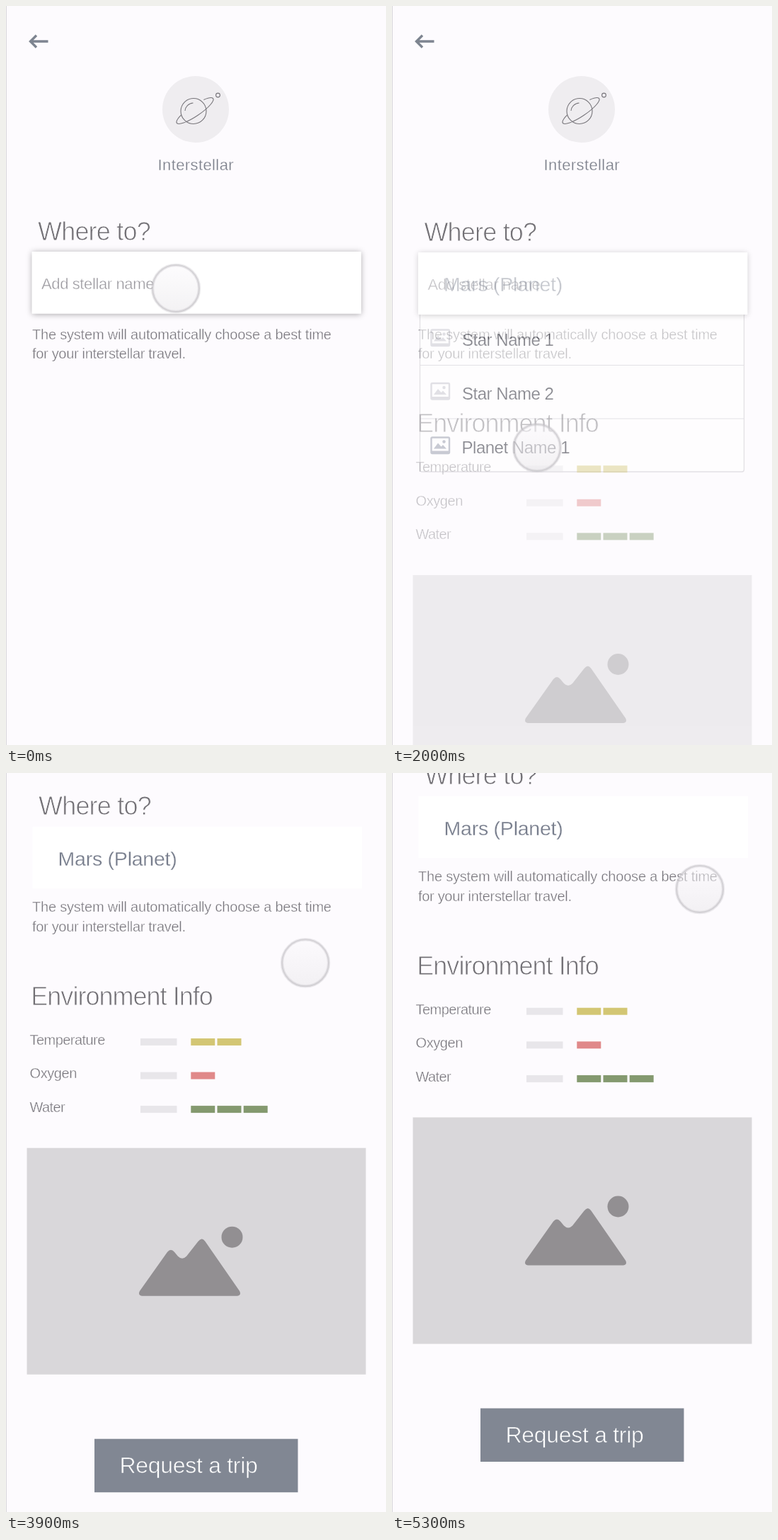
Recreate the animation shown at these times as an HTML page. Size 537 by 1044 pixels, loop 5400 ms.

```html
<!DOCTYPE html>
<html lang="en">
<head>
<meta charset="utf-8">
<title>Trip planner</title>
<style>
  html, body { margin: 0; width: 100%; height: 100%; overflow: hidden; background: #fdfbfe; }
  svg { display: block; width: 537px; height: 1044px; }
  /* a stroke in the backdrop colour slims the letters */
  text { font-family: "Liberation Sans", Arial, sans-serif; stroke: #fdfbfe; stroke-width: .02em; fill: #77757b; }
  .title { font-size: 36px; letter-spacing: -.98px; fill: #727075; stroke-width: .026em; }
  .small { font-size: 20px; }
  .onwhite text { stroke: #fff; }
  .row text { font-size: 24px; letter-spacing: -.48px; fill: #383a43; stroke-width: .01em; }
  .shadow { filter: drop-shadow(0 1px 4px rgba(0, 0, 0, .34)); }
  .line { fill: none; stroke: #77757a; stroke-width: 1.1; }
</style>
</head>
<body>
<svg viewBox="0 0 537 1044">
  <defs>
    <linearGradient id="glass" x1="0" y1="0" x2="0" y2="1">
      <stop offset="0" stop-color="#fbf9fc" stop-opacity=".5"/>
      <stop offset="1" stop-color="#e9e7ea" stop-opacity=".55"/>
    </linearGradient>
    <g id="pic">
      <rect x="55.5" y="457.5" width="25.5" height="22.5" rx="1.5" fill="none" stroke="currentColor" stroke-width="2.4"/>
      <path d="M59 473.5L65 465.5L69.5 470.5L72 468L77 473.5Z" fill="currentColor"/>
      <path d="M56 476.5H81V480H56Z" fill="currentColor"/>
      <circle cx="73.5" cy="463.5" r="2.2" fill="currentColor"/>
    </g>
  </defs>
  <rect width="537" height="1044" fill="#fdfbfe"/>

  <g id="page">
    <path d="M59.5 50H35M43 41.5L34.5 50L43 58.5" fill="none" stroke="#7d8490" stroke-width="3.4"/>
    <circle cx="268" cy="146" r="47" fill="#efedf0"/>
    <g class="line">
      <circle cx="265" cy="148.5" r="18"/>
      <path d="M253 148A12 12 0 0 1 264.5 137"/>
      <path transform="translate(267 148) rotate(-34)" d="M-19-6A31 7.600 0 1 0 19-6"/>
      <circle cx="299.5" cy="126" r="2.9"/>
    </g>
    <text x="214.5" y="232" font-size="22" letter-spacing=".4" style="fill:#7c818b;stroke-width:.014em">Interstellar</text>

    <text class="small" x="37" y="470.5" letter-spacing="-.2">The system will automatically choose a best time</text>
    <text class="small" x="37" y="498" letter-spacing="-.31">for your interstellar travel.</text>

    <g id="menu" class="onwhite">
      <rect x="39.5" y="425" width="458" height="233" rx="3" fill="#fff" stroke="#cfcdd3" stroke-width="1.3"/>
      <path d="M40 507.5H497M40 583H497" stroke="#d2d0d6" stroke-width="1.2"/>
      <g class="row" color="#cdced4">
        <use href="#pic"/>
        <text x="99" y="480">Star Name 1</text>
        <use href="#pic" y="75.5"/>
        <text x="99" y="555.5">Star Name 2</text>
        <use href="#pic" y="152" id="picked"/>
        <text x="98.5" y="631.5">Planet Name 1</text>
      </g>
    </g>

    <g id="field" class="onwhite">
      <text class="title" x="45" y="330.5" style="stroke:#fdfbfe;letter-spacing:-.8px">Where to?</text>
      <rect id="lift" class="shadow" x="37" y="347" width="464.5" height="87.5" fill="#fff"/>
      <rect x="36.5" y="347" width="465.5" height="87.5" fill="#fff"/>
      <text id="hint" x="50" y="400" font-size="22" letter-spacing="-.38" style="fill:#9b999f">Add stellar name</text>
      <text id="choice" x="72.5" y="402" font-size="28.5" letter-spacing="-.23" style="fill:#787e8d;stroke-width:.01em">Mars (Planet)</text>
    </g>

    <g id="info">
      <text class="title" x="35.3" y="602">Environment Info</text>
      <g id="bars"></g>
      <rect x="29.5" y="804" width="479" height="320" fill="#d9d7da"/>
      <g fill="#928f92">
        <path d="M192 1013Q186 1012 189 1006L228 951Q233 945 238 951L243 957Q249 963 255 957L271.500 936Q277 929 281.500 936L330 1006Q333 1012 327 1013Z"/>
        <circle cx="319.5" cy="930" r="15"/>
      </g>
      <rect x="125" y="1215" width="287.5" height="75.5" fill="#818793"/>
      <text x="160.5" y="1263.5" font-size="32" letter-spacing="-.3" style="fill:#fff;stroke:#818793">Request a trip</text>
    </g>
  </g>

  <rect width="1" height="1044" fill="#dad8dc"/>
  <g id="touch">
    <circle r="33.5" fill="url(#glass)"/>
    <circle r="33" fill="none" stroke="#c0bec2" stroke-opacity=".3" stroke-width="4.5"/>
    <circle r="33" fill="none" stroke="#c0bec2" stroke-opacity=".5" stroke-width="2"/>
  </g>
</svg>
<script>
const LOOP = 5400;
const $ = id => document.getElementById(id);

const levels = [["Temperature", 2, "#d3c674", -.55], ["Oxygen", 1, "#e08989", -.4], ["Water", 3, "#84996f", -.6]];
const bar = (x, y, w, color) => `<rect x="${x}" y="${y}" width="${w}" height="10" fill="${color}"/>`;
$("bars").innerHTML = levels.map(([name, count, color, gap], i) => {
  const y = 649.2 + i * 47.6;
  let row = `<text class="small" x="33.5" y="${y + 8.8}" letter-spacing="${gap}">${name}</text>` + bar(190, y, 51.5, "#e8e6ea");
  for (let k = 0; k < count; k++) row += bar(261.3 + k * 37.2, y, 34, color);
  return row;
}).join("");

// smooth curve through [time, value] points without overshoot
function track(pts) {
  const n = pts.length;
  const rise = i => (pts[i + 1][1] - pts[i][1]) / (pts[i + 1][0] - pts[i][0]);
  const slope = pts.map((_, i) => {
    if (i === 0 || i === n - 1) return 0;
    const a = rise(i - 1), b = rise(i);
    return a * b > 0 ? 2 * a * b / (a + b) : 0;
  });
  return t => {
    if (t <= pts[0][0]) return pts[0][1];
    if (t >= pts[n - 1][0]) return pts[n - 1][1];
    const i = pts.findIndex(p => p[0] > t) - 1;
    const [t0, v0] = pts[i], [t1, v1] = pts[i + 1];
    const d = t1 - t0, u = (t - t0) / d, w = 1 - u;
    return w * w * (1 + 2 * u) * v0 + u * u * (3 - 2 * u) * v1
      + d * u * w * (w * slope[i] - u * slope[i + 1]);
  };
}

const touchX = track([[600, 240], [1230, 205], [2350, 205], [2850, 284], [2900, 299], [3470, 396],
  [3650, 394], [3900, 423], [4100, 433], [4550, 435]]);
const touchY = track([[600, 399], [1230, 624], [2350, 624], [2850, 857], [3470, 904],
  [3650, 687], [3775, 429], [3900, 269], [4100, 180], [4550, 164]]);
const scroll = track([[3500, 0], [3650, 86], [3775, 201], [3900, 274], [4100, 311], [4550, 317.5]]);
const open = track([[0, 0], [350, 1]]);
const hover = track([[950, 0], [1150, 1]]);
const swap = track([[1800, 0], [2250, 1]]);

function draw(t) {
  const p = swap(t), h = hover(t);
  const mix = (a, b) => Math.round(a + (b - a) * h);
  $("page").setAttribute("transform", `translate(0 ${-scroll(t)})`);
  $("touch").setAttribute("transform", `translate(${touchX(t)} ${touchY(t)})`);
  $("field").setAttribute("transform", `translate(${p} ${3 * p})`);
  $("picked").setAttribute("color", `rgb(${mix(205, 163)},${mix(206, 167)},${mix(212, 181)})`);
  $("menu").style.opacity = open(t) * (1 - p);
  $("lift").style.opacity = $("hint").style.opacity = 1 - p;
  $("choice").style.opacity = $("info").style.opacity = p;
}

const start = performance.now();
function frame() {
  draw((performance.now() - start) % LOOP);
  requestAnimationFrame(frame);
}
draw(0);
requestAnimationFrame(frame);
</script>
</body>
</html>
```
